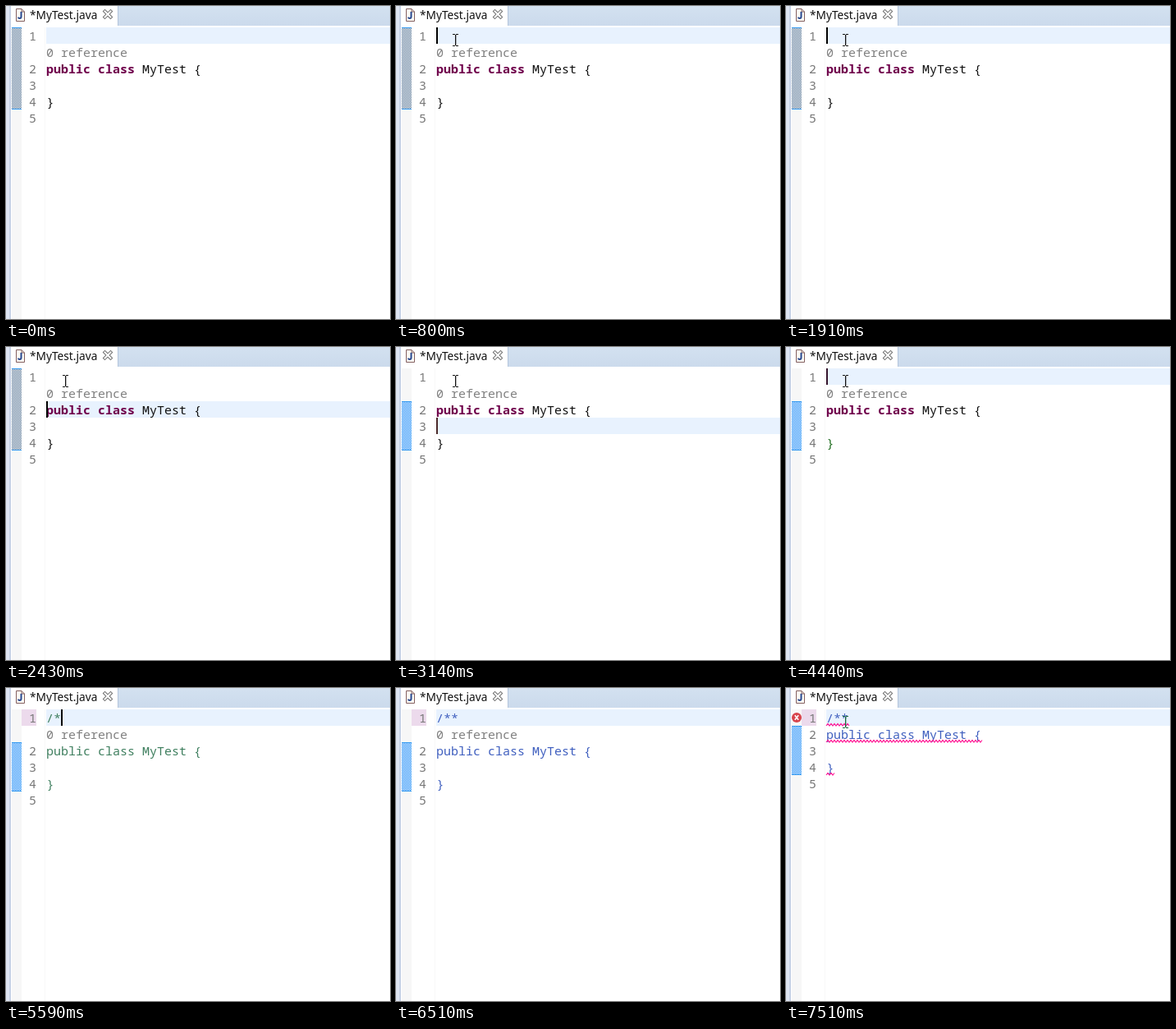
Recreate the animation shown at these times as an HTML page. Size 468 px wide and 381 px high, loop 8 s.

```html
<!DOCTYPE html>
<html lang="en">
<head>
<meta charset="utf-8">
<title>Java editor</title>
<style>
  html, body { margin: 0; width: 100%; height: 100%; overflow: hidden; background: #fff; }
  svg { display: block; width: 468px; height: 381px; }
  text { white-space: pre; }
  .mono { font: 15px "Noto Sans Mono", "DejaVu Sans Mono", monospace; }
  .num { fill: #787878; }
  .lens { fill: #808080; }
  .kw { fill: #6f004b; font-weight: bold; }
  .comment .kw { fill: inherit; font-weight: normal; }
  .wave { fill: none; stroke: #ff1493; stroke-width: 1.1; }
</style>
</head>
<body>
<svg viewBox="0 0 468 381" xmlns="http://www.w3.org/2000/svg">
  <defs>
    <linearGradient id="bar" x2="0" y2="1">
      <stop offset="0" stop-color="#d3e1f0"/>
      <stop offset="1" stop-color="#cbdaec"/>
    </linearGradient>
    <pattern id="check" width="2" height="2" patternUnits="userSpaceOnUse">
      <rect width="2" height="2" fill="#f2f4f7"/>
      <path id="dots" d="M1 0h1v1h-1zM0 1h1v1h-1z"/>
    </pattern>
  </defs>

  <rect width="468" height="381" fill="#fff"/>
  <rect width="468" height="24" fill="url(#bar)"/>
  <rect width="4" height="381" fill="#dee4f2"/>
  <rect x="4" width="2" height="381" fill="#c6d1e5"/>
  <path d="M6 24V0H136V24Z" fill="#fff"/>
  <rect x="136" width="1" height="24" fill="#b4c5dc"/>

  <!-- file icon -->
  <path d="M12.5 3.5H19L22.5 7V18.5H12.5Z" fill="#fbfaf4" stroke="#846060"/>
  <path d="M19 3.5V7H22.5" fill="none" stroke="#846060"/>
  <path d="M18.5 7V13Q18.5 15 16.8 15T14.8 13.6" fill="none" stroke="#27478f" stroke-width="2"/>
  <text x="29" y="16" font-family="'Noto Sans', 'Open Sans', sans-serif" font-size="13.7" fill="#111">*MyTest.java</text>
  <!-- close button -->
  <path d="M120.5 6.5L127.5 13.5M127.5 6.5L120.5 13.5" stroke="#6e6e6e" stroke-width="4" stroke-linecap="square"/>
  <path d="M120.5 6.5L127.5 13.5M127.5 6.5L120.5 13.5" stroke="#fff" stroke-width="2" stroke-linecap="square"/>

  <rect x="7" y="26" width="12" height="355" fill="#f7f7f7"/>
  <rect x="47" y="26" width="1" height="355" fill="#f8f8f8"/>
  <rect id="row" x="49" width="419" height="20" fill="#e8f2fe"/>
  <rect id="changed" x="19" y="26" width="18" height="20" fill="#ecdaec"/>
  <rect id="range" x="7" width="12" fill="url(#check)"/>
  <g fill="#3399f0">
    <rect id="top" x="7" width="12" height="1"/>
    <rect id="bottom" x="7" width="12" height="1"/>
  </g>

  <g class="mono">
    <text class="num" x="28" y="42">1</text>
    <text id="lens" class="lens" x="49" y="62">0 reference</text>
    <g id="code">
      <text id="typed" x="49" y="42"></text>
      <g id="body">
        <rect id="match" x="229.5" y="68.5" width="8" height="16" fill="none" stroke="#b8b8b8"/>
        <text x="49" y="82"><tspan class="kw">public</tspan> <tspan class="kw">class</tspan> MyTest {</text>
        <text id="brace" x="49.5" y="122">}</text>
        <g id="nums" class="num"></g>
      </g>
    </g>
  </g>

  <g id="errors">
    <circle cx="13" cy="36" r="6" fill="#d8444c"/>
    <path d="M10.8 33.3L15.2 38.7M15.2 33.3L10.8 38.7" stroke="#fff" stroke-width="1.6"/>
  </g>
  <rect id="caret" width="2" height="20"/>
  <path id="mouse" d="M-3-7h3v1h-3zM1-7h3v1h-3zM0-6h1.3v13h-1.3zM-3 7h3v1h-3zM1 7h3v1h-3z"/>
</svg>

<script>
const LOOP = 8000;
const $ = id => document.getElementById(id);
const NS = "http://www.w3.org/2000/svg";
const SLATE = "#64809c", BLUE = "#1e90ff", BLACK = "#000";
const rowY = [26, 66, 86, 106];

function add(parent, tag, attrs, label) {
  const el = document.createElementNS(NS, tag);
  for (const key in attrs) el.setAttribute(key, attrs[key]);
  if (label) el.textContent = label;
  parent.append(el);
}

function wave(left, right, y) {
  let d = `M${left} ${y}`;
  for (let x = left + 2, i = 1; x <= right; x += 2, i++) d += `L${x} ${y - (i % 2) * 2.5}`;
  add($("errors"), "path", { class: "wave", d });
}

for (let n = 2; n <= 5; n++) add($("nums"), "text", { x: 28, y: 42 + n * 20 }, n);
wave(49, 77, 46);
wave(49, 239, 66);
wave(49, 60, 106);

// Each step changes only the listed parts of the editor.
const steps = [
  [0, { line: 0, caret: false, ink: BLACK, typed: "", color: "#111", brace: "#111",
        range: [26, 100], dots: SLATE, match: false, errors: false }],
  [800, { caret: true }],
  [1340, { caret: false }],
  [1910, { caret: true }],
  [2430, { line: 1 }],
  [2960, { range: [66, 60], dots: BLUE }],
  [3140, { line: 2, ink: "#4b2a2a" }],
  [3420, { line: 3, match: true, brace: "#1c6b1c" }],
  [3810, { line: 2, match: false, ink: "#1c5c2c" }],
  [4120, { line: 1 }],
  [4440, { line: 0, ink: "#35142c" }],
  [4990, { caret: false }],
  [5200, { caret: true, typed: "/", ink: BLACK }],
  [5590, { typed: "/*", color: "#3f7f5f", brace: "#3f7f5f" }],
  [5970, { typed: "/**", color: "#3f5fbf", brace: "#3f5fbf" }],
  [6510, { caret: false }],
  [6830, { errors: true, range: [46, 60] }],
  [7060, { caret: true }],
  [7510, { caret: false }]
];

function stateAt(t) {
  const s = {};
  for (const [start, change] of steps) if (t >= start) Object.assign(s, change);
  return s;
}

function mouseAt(t) {
  if (t < 70 || (t >= 5200 && t < 6830)) return null;
  if (t < 180) return [94, 88];
  if (t < 360) return [87, 75];
  const k = Math.min(1, (Math.floor((t - 360) / 73) + 1) / 7);
  const p = 1 - (1 - k) ** 2;
  return [Math.round(87 - 15 * p), Math.round(75 - 34 * p)];
}

const set = (id, name, value) => $(id).setAttribute(name, value);
const show = (id, on) => set(id, "visibility", on ? "visible" : "hidden");

function draw(t) {
  const s = stateAt(t), y = rowY[s.line], [top, height] = s.range;
  set("row", "y", y);
  set("caret", "x", 49 + s.typed.length * 9);
  set("caret", "y", y);
  set("caret", "fill", s.ink);
  show("caret", s.caret);

  set("range", "y", top);
  set("range", "height", height);
  set("dots", "fill", s.dots);
  set("top", "y", top);
  set("bottom", "y", top + height - 1);

  $("typed").textContent = s.typed;
  set("code", "fill", s.color);
  set("code", "class", s.typed.length > 1 ? "comment" : "");
  set("brace", "fill", s.brace);
  set("body", "transform", `translate(0 ${s.errors ? -20 : 0})`);
  show("changed", s.typed);
  show("match", s.match);
  show("lens", !s.errors);
  show("errors", s.errors);

  const m = mouseAt(t);
  show("mouse", m);
  if (m) set("mouse", "transform", `translate(${m})`);
  set("mouse", "fill", s.errors ? "#17693a" : "#111");
}

const begin = performance.now();
function tick() {
  draw((performance.now() - begin) % LOOP);
  requestAnimationFrame(tick);
}
tick();
</script>
</body>
</html>
```
